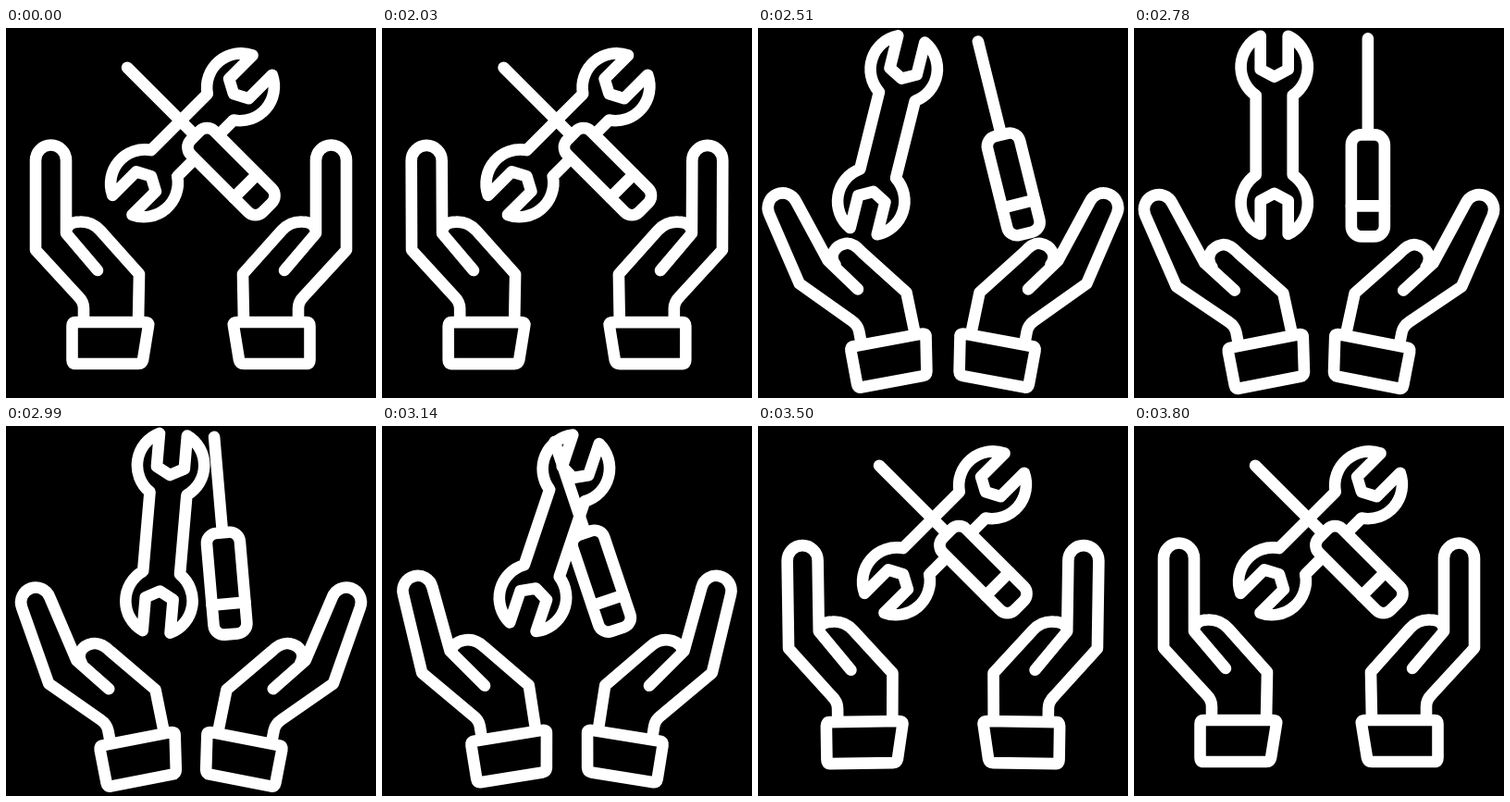
These frames come from a looping animation (400 px wide and 400 px high, 3.83 s). An HTML page:

```html
<!DOCTYPE html>
<html lang="en">
<head>
<meta charset="utf-8">
<title>Hands and tools</title>
<style>
  html, body { margin: 0; height: 100%; overflow: hidden; background: #000; }
  svg { display: block; width: 100%; height: 100%; }
</style>
</head>
<body>
<svg viewBox="0 0 400 400" fill="none" stroke="#fff" stroke-width="12.6" stroke-linecap="round" stroke-linejoin="round">
  <g id="hand">
    <path id="palm"/>
    <path d="M75 318H150Q155 318 154 322L148 359Q147 363 143 363H75Q71.5 363 71.5 359V322Q71.5 318 75 318Z"/>
  </g>
  <use href="#hand" transform="matrix(-1 0 0 1 400 0)"/>
  <path id="wrench" d="M-15-107V-71L0-63 15-71V-107A37 37 0 0 1 20-43V43A37 37 0 0 1 15 107V71L0 63-15 71V107A37 37 0 0 1-20 43V-43A37 37 0 0 1-15-107Z"/>
  <g id="driver">
    <path d="M0-107V-3"/>
    <rect x="-18" y="-3" width="36" height="110" rx="11" fill="#000"/>
    <path d="M-18 74H18"/>
  </g>
</svg>
<script>
const LOOP = 3830, START = 2030, STEP = 30;
const el = id => document.getElementById(id);
const palm = el('palm'), hand = el('hand'), wrench = el('wrench'), driver = el('driver');

const ease = (t, from, to) => {
  const x = Math.min(1, Math.max(0, (t - from) / (to - from)));
  return (1 - Math.cos(Math.PI * x)) / 2;
};
// rises from a to b, falls back from c to d
const pulse = (t, a, b, c, d) => ease(t, a, b) - ease(t, c, d);
const place = (node, x, y, angle, pivot = '') =>
  node.setAttribute('transform', `translate(${x} ${y}) rotate(${angle} ${pivot})`);

// open bends the finger outwards, lift raises the knuckles
function palmPath(open, lift) {
  const p = (x, y, x2, y2, up = 0) =>
    `${x + (x2 - x) * open} ${y + (y2 - y) * open - up} `;
  return `M84 317V303Q84 296 78 290L${p(32, 240, 30, 242, lift)}` +
    `L${p(32, 143, 11.5, 160)}A16 16 0 0 1 ${p(65, 143, 42.6, 152.5)}` +
    `L${p(65, 222, 65, 223, lift)}L${p(99, 262, 91, 258)}` +
    `M${p(65, 222, 72, 229, lift)}C${p(65, 214, 66, 216)}${p(70, 209.5, 76, 207)}${p(80, 209.5, 87, 207)}` +
    `Q${p(93, 209, 95, 207)}${p(102, 219, 103, 220)}` +
    `L${p(144, 266, 142, 271)}L143 317`;
}

function draw(t) {
  const swing = pulse(t, 2000, 2590, 2960, 3620);
  const open = pulse(t, 2000, 2420, 2741, 3414);
  const apart = pulse(t, 2000, 2510, 2510, 3450);
  const tilt = 45 - 45 * pulse(t, 2183, 2707, 2850, 3503);

  palm.setAttribute('d', palmPath(open, 32 * swing * (1 - swing)));
  place(hand, 33 * swing, 20 * swing, -11 * swing, '112.5 340');
  place(wrench, 201.5 - 61.5 * apart, 115.8, tilt);
  place(driver, 206.7 + 57 * apart, 118.4, -tilt);
}

function frame() {
  const t = performance.now() % LOOP;
  draw(t < START ? 0 : START + Math.floor((t - START) / STEP) * STEP);
  requestAnimationFrame(frame);
}
frame();
</script>
</body>
</html>
```
